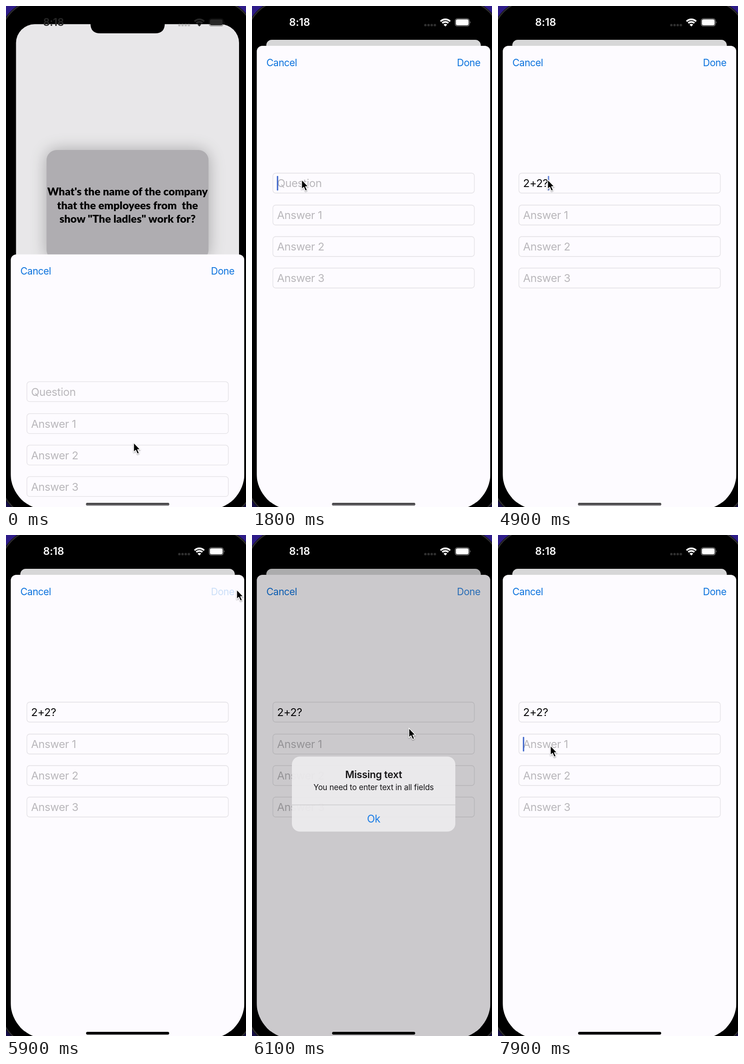
These frames come from a looping animation (517x1082 px, 8 s). An HTML page:

```html
<!DOCTYPE html>
<html lang="en">
<head>
<meta charset="utf-8">
<title>Add a flashcard</title>
<style>
  html, body { margin: 0; width: 100%; height: 100%; overflow: hidden; background: #000; }
  svg { display: block; width: 100vw; height: 100vh; }
  text { white-space: pre; }
  svg { font-family: Inter, Roboto, sans-serif; }
  .nav { font-size: 21px; letter-spacing: -.5px; fill: #0b72dd; }
  .input { font-size: 23.5px; letter-spacing: -.4px; fill: #b9b7bb; }
  .box { fill: none; stroke: #e3e1e5; stroke-width: 1.3; }
  .middle { text-anchor: middle; }
  .card { font: 900 24.5px Lato, "Open Sans", sans-serif; }
</style>
</head>
<body>
<svg viewBox="0 0 517 1082" preserveAspectRatio="none">
  <defs>
    <linearGradient id="desk" x2="0" y2="1">
      <stop stop-color="#2d1b88"/><stop offset="1" stop-color="#150e45"/>
    </linearGradient>
    <linearGradient id="bar" x2="0" y2="1">
      <stop stop-color="#3b3a3c"/><stop offset="1" stop-color="#706f72"/>
    </linearGradient>
    <filter id="glow" x="-30%" y="-30%" width="160%" height="160%"><feGaussianBlur stdDeviation="19"/></filter>
    <filter id="soft" x="-50%" y="-50%" width="200%" height="200%">
      <feDropShadow dx="0" dy="1.5" stdDeviation="1.3" flood-opacity=".4"/>
    </filter>
    <clipPath id="screen"><rect x="10" y="2" width="503.5" height="1086" rx="78"/></clipPath>
  </defs>

  <rect width="517" height="1082" fill="url(#desk)"/>
  <rect x="-15" y="-15" width="553" height="1122" rx="88" fill="#000"/>
  <rect x="-13" y="-13" width="549" height="1118" rx="86" fill="none" stroke="#2b2a2d" stroke-width="3"/>

  <g clip-path="url(#screen)">
    <g id="back">
      <rect id="page" x="-251.5" width="503" height="1088" fill="#fdfcfe"/>
      <rect x="-182.7" y="284.4" width="365.4" height="249" rx="23" opacity=".28" filter="url(#glow)"/>
      <rect x="-182.7" y="284.4" width="365.4" height="249" rx="23" fill="#bfbdc1"/>
      <g class="card middle">
        <text y="387">What's the name of the company</text>
        <text y="418">that the employees from  the</text>
        <text y="449">show "The ladles" work for?</text>
      </g>
      <rect id="shade" x="-251.5" width="503" height="1088"/>
    </g>
    <g id="sheet">
      <rect x="10.3" width="503" height="1100" rx="12" fill="#fdfbff"/>
      <text class="nav" x="31" y="44">Cancel</text>
      <text class="nav" id="done" x="441.5" y="44">Done</text>
      <g id="fields"></g>
      <rect id="caret" width="2.8" height="31.5" rx="1.2" fill="#3a62c9"/>
    </g>
    <rect id="dim" width="517" height="1082"/>
  </g>

  <path d="M174 0H350Q342 2 342 14V38Q342 59 321 59H203Q182 59 182 38V14Q182 2 174 0Z"/>
  <g id="status">
    <text x="80" y="43" font-size="22.4" font-weight="600" letter-spacing="-.1">8:18</text>
    <g fill="none" stroke-width="3.7">
      <path d="M406.2 33.2A14.6 14.6 0 0 1 426.8 33.2"/>
      <path d="M410 37A9.2 9.2 0 0 1 423 37"/>
    </g>
    <path stroke="none" d="M416.5 44.2L412.6 40.2A5.5 5.5 0 0 1 420.4 40.2Z"/>
    <rect x="437.6" y="27.2" width="30.6" height="16.2" rx="5" fill="none" stroke-width="1.3" opacity=".5"/>
    <rect x="439.2" y="28.8" width="27.4" height="13" rx="3.6" stroke="none"/>
    <path stroke="none" opacity=".5" d="M469.6 32.5Q472 35.3 469.6 38.1Z"/>
  </g>
  <g id="dots"></g>

  <rect x="172.5" y="1073" width="179" height="6" rx="3" fill="#000"/>
  <rect id="home" x="172.5" y="1073" width="179" height="6" rx="3" fill="url(#bar)"/>

  <g id="alert">
    <rect x="-172.5" y="-79.5" width="345" height="159" rx="17" fill="#ecebed" opacity=".94"/>
    <path d="M-172.5 23H172.5" stroke="#c8c7ca" stroke-width="1.2"/>
    <g class="middle">
      <text y="-33.5" font-size="21" font-weight="600" letter-spacing="-.3" fill="#161517">Missing text</text>
      <text y="-8" font-size="16.5" letter-spacing="-.15" fill="#161517">You need to enter text in all fields</text>
      <text y="60" font-size="22" letter-spacing="-.4" fill="#1b7de6">Ok</text>
    </g>
  </g>

  <path id="mouse" d="M0 0V20.5L4.5 16.3L8 24.3L11.8 22.7L8.3 15H14.3Z" stroke="#fff" stroke-width="1.4" stroke-linejoin="round" filter="url(#soft)"/>
</svg>

<script>
const LOOP = 8000, STEP = 100;
const $ = id => document.getElementById(id);
const set = (el, attrs) => { for (const k in attrs) el.setAttribute(k, attrs[k]); };
const make = (parent, tag, attrs, label = '') => {
  const el = document.createElementNS('http://www.w3.org/2000/svg', tag);
  set(el, attrs);
  el.textContent = label;
  return parent.appendChild(el);
};
const clamp = v => Math.min(1, Math.max(0, v));
const mix = (a, b, p) => a + (b - a) * p;
const gray = v => `rgb(${v},${v},${v})`;

const FIELD_TOPS = [275, 344, 412, 480];
const labels = ['Question', 'Answer 1', 'Answer 2', 'Answer 3'].map((label, i) => {
  const y = FIELD_TOPS[i];
  make($('fields'), 'rect', { class: 'box', x: 45, y, width: 434, height: 43, rx: 6 });
  return make($('fields'), 'text', { class: 'input', x: 54, y: y + 30.3 }, label);
});
for (let i = 0; i < 4; i++)
  make($('dots'), 'rect', { x: 371 + i * 6.8, y: 38.8, width: 5, height: 5, rx: 1.6 });

// Share of the way left in a critically damped spring
const spring = ms => {
  const x = Math.max(0, ms) * 0.0183;
  return (1 + x) * Math.exp(-x);
};

const QUESTION = '2+2?';
const KEY_TIMES = [2500, 3000, 3500, 4000];
const SHEET_IN = -101, FOCUS = 1500, NEXT_FOCUS = 7700;
const PRESS = 5800, ALERT_IN = 5900, ALERT_OUT = 7200;

// time, x, y of the pointer
const POINTER = [
  [0, 275, 943], [400, 275, 943], [1400, 107, 375], [4950, 107, 375],
  [5700, 497, 118], [5900, 497, 118], [6100, 338, 417], [6600, 219, 608],
  [7200, 219, 608], [7700, 113, 455], [LOOP, 113, 455]
];

function pointerAt(t) {
  const i = POINTER.findIndex(k => k[0] > t);
  const [t0, x0, y0] = POINTER[i - 1], [t1, x1, y1] = POINTER[i];
  const p = (t - t0) / (t1 - t0), eased = p * p * (3 - 2 * p);
  return [mix(x0, x1, eased), mix(y0, y1, eased)];
}

function caretOpacity(t) {
  if (t < FOCUS || (t >= PRESS - 100 && t < 6700)) return 0;
  const last = Math.max(...[FOCUS, ...KEY_TIMES, NEXT_FOCUS].filter(k => k <= t));
  const phase = (t - last) % 1000;
  if (phase < 400) return 1;
  return phase < 500 ? 0.5 : phase < 900 ? 0 : 0.8;
}

function drawSheet(t) {
  const left = spring(t - SHEET_IN), p = 1 - left;
  set($('back'), { transform: `translate(261.8 ${mix(-2, 73, p)}) scale(${1 - 0.0815 * p})` });
  const rx = mix(78, 13, p);
  set($('page'), { rx });
  set($('shade'), { rx, opacity: 0.15 * p });
  set($('sheet'), { transform: `translate(0 ${86 + 1004 * left})` });

  const light = clamp((p - 0.55) / 0.4);
  const ink = gray(Math.round(mix(38, 255, light)));
  set($('status'), { fill: ink, stroke: 'none' });
  $('status').querySelectorAll('[fill=none]').forEach(el => set(el, { stroke: ink }));
  set($('dots'), { fill: gray(Math.round(mix(184, 48, light))) });
}

function drawInput(t) {
  const typed = QUESTION.slice(0, KEY_TIMES.filter(k => k <= t).length);
  labels[0].textContent = typed || 'Question';
  labels[0].style.fill = typed ? '#09080a' : '';
  const next = t >= NEXT_FOCUS;
  const width = typed && !next ? labels[0].getComputedTextLength() : 0;
  set($('caret'), { x: 53.6 + width, y: FIELD_TOPS[next ? 1 : 0] + 6, opacity: caretOpacity(t) });
}

function drawAlert(t) {
  const rest = spring(t - ALERT_IN);
  const shown = clamp((1 - rest) * 1.14) * spring(t - ALERT_OUT);
  set($('alert'), { transform: `translate(262 559.5) scale(${1 + 0.17 * rest})`, opacity: shown });
  set($('dim'), { opacity: 0.2 * shown });
  const done = t < PRESS ? 1 : clamp(0.2 + (t - ALERT_IN) / 310);
  set($('done'), { opacity: Math.max(0.2, done) });
}

function draw(t) {
  drawSheet(t);
  drawInput(t);
  drawAlert(t);
  set($('home'), { opacity: clamp((5800 - t) / 500) });
  const [x, y] = pointerAt(t);
  set($('mouse'), { transform: `translate(${x} ${y})` });
}

const start = performance.now();
function tick() {
  const t = (performance.now() - start) % LOOP;
  draw(Math.floor(t / STEP) * STEP);
  requestAnimationFrame(tick);
}
tick();
</script>
</body>
</html>
```
